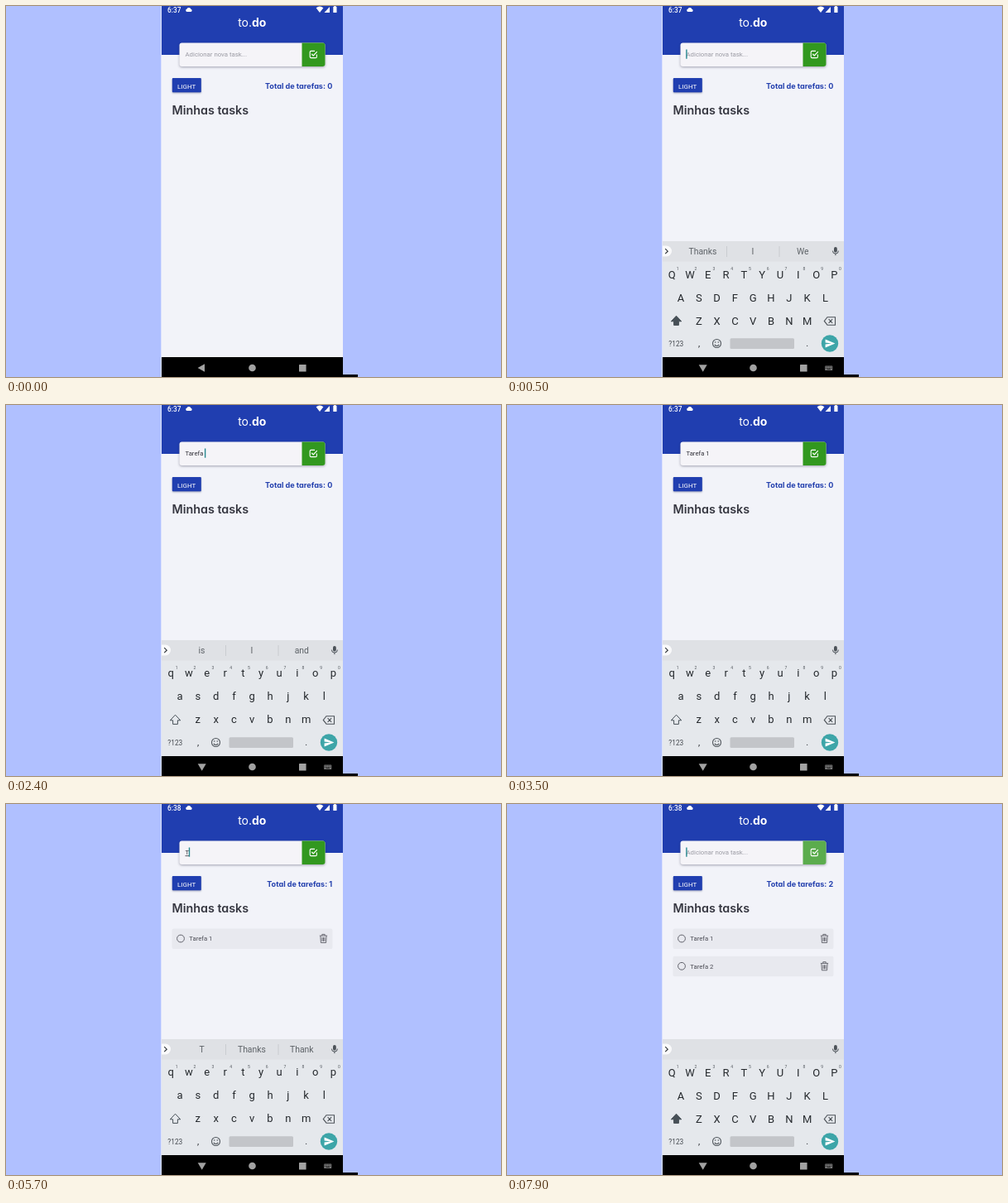
Write an HTML page with a canvas that moves like this. It is 598 by 448 pixels and loops after 8000 ms.

```html
<!DOCTYPE html>
<html lang="pt">
<head>
<meta charset="utf-8">
<title>to.do</title>
<style>
html, body { margin: 0; width: 100%; height: 100%; overflow: hidden; background: #b0c0ff; }
canvas, svg { position: absolute; left: 0; top: 0; }
text { font-family: Inter, "Open Sans", sans-serif; font-feature-settings: "cv11"; }
</style>
</head>
<body>
<canvas id="stage" width="598" height="448"></canvas>
<svg width="598" height="448">
  <text x="297.3" y="25.3" font-size="14" fill="#fff" text-anchor="middle">to.<tspan font-weight="700">do</tspan></text>
  <text id="total" x="394.3" y="99.5" font-size="9.1" font-weight="700" fill="#2440ae" text-anchor="end"></text>
  <text x="200.6" y="131.3" font-size="14.3" font-weight="600" fill="#363741">Minhas tasks</text>
</svg>
<script>
const LOOP = 8000;
const g = document.getElementById('stage').getContext('2d');
const total = document.getElementById('total');

// Each track is a list of [start, value] steps.
const typed = [[0, ''], [1700, 'T'], [1800, 'Ta'], [1900, 'Tar'], [2100, 'Tare'], [2200, 'Taref'],
  [2300, 'Tarefa'], [2400, 'Tarefa '], [2900, 'Tarefa 1'], [4400, ''], [5700, 'T'], [5800, 'Ta'],
  [6100, 'Tare'], [6200, 'Taref'], [6300, 'Tarefa'], [6400, 'Tarefa '], [6500, 'Tarefa 2'], [7900, '']];
const caret = [[0, 0], [100, 1], [600, 0], [1200, 1], [3500, 0], [4000, 1], [4800, 0], [5300, 1], [7100, 0], [7600, 1]];
const caps = [[0, 1], [1700, 0], [4400, 1], [5700, 0], [7900, 1]];
const press = [[0, 0], [4000, .5], [4100, 1], [4500, 0], [7600, 1]];
const tasks = [[0, 0], [4400, 1], [7900, 2]];
const lift = [[0, 150], [300, 85], [400, 18], [500, 0]];
const idle = [[0, 'Thanks I We'], [4400, ''], [4500, 'Thanks I We'], [7900, '']];
const hints = {
  T: 'T Thanks Thank', Ta: 'Ta Take Talk', Tar: 'Tar Target Tara', Tare: 'Tare Tared Tares',
  Taref: 'Taref Tarefa Tare', Tarefa: 'Tarefa Tarefas Tare', 'Tarefa ': 'is I and'
};

const at = (track, t) => track.reduce((v, s) => t >= s[0] ? s[1] : v, track[0][1]);

function box(x, y, w, h, color, r = 0) {
  g.fillStyle = color;
  g.beginPath();
  g.roundRect(x, y, w, h, r);
  g.fill();
}

function disc(x, y, r, color) {
  g.fillStyle = color;
  g.beginPath();
  g.arc(x, y, r, 0, 7);
  g.fill();
}

function ring(x, y, r, color, w = 1) {
  g.strokeStyle = color;
  g.lineWidth = w;
  g.beginPath();
  g.arc(x, y, r, 0, 7);
  g.stroke();
}

function fill(d, color) {
  g.fillStyle = color;
  g.fill(new Path2D(d));
}

function line(d, color, w = 1) {
  g.strokeStyle = color;
  g.lineWidth = w;
  g.stroke(new Path2D(d));
}

function label(s, x, y, size, color, align = 'left', weight = 400) {
  g.font = `${weight} ${size}px Roboto, Arial, sans-serif`;
  g.textAlign = align;
  g.fillStyle = color;
  g.fillText(s, x, y);
}

function shadow(color, blur, dy) {
  g.shadowColor = color;
  g.shadowBlur = blur;
  g.shadowOffsetY = dy;
}

const noShadow = () => shadow('transparent', 0, 0);

function drawHeader(t) {
  box(188, 0, 219, 59, '#203eb0');
  label(t < 4400 ? '6:37' : '6:38', 195, 7.6, 8.3, '#fff', 'left', 500);
  fill('M218.6 7a1.8 1.8 0 0 1 0-3.5a2.6 2.6 0 0 1 4.8 .3a1.7 1.7 0 0 1 .2 3.2z', '#fff');
  fill('M374.6 2.2Q379 -1 383.4 2.2L379 8z', '#fff');
  fill('M384.5 8L391 1V8z', '#fff');
  box(395.3, .8, 4.2, 7.2, '#fff', .6);
  box(396.4, 0, 2, 1, '#fff');
}

function drawInput(t) {
  const text = at(typed, t);
  shadow('rgba(40,40,70,.4)', 3, 1);
  box(209.5, 44.5, 176, 28.5, '#f5f4f8', 3);
  noShadow();
  const p = at(press, t);
  box(357.5, 44.5, 28, 28.5, `rgb(${50 + 41 * p},${152 + 20 * p},${31 + 46 * p})`, [0, 3, 3, 0]);
  line('M375.4 58.5V61.2Q375.4 62.6 374 62.6H368.6Q367.2 62.6 367.2 61.2V55.8Q367.2 54.4 368.6 54.4H373', '#fff', 1.1);
  line('M369.3 58L371.3 60L375.8 55.2', '#fff', 1.2);

  if (text) label(text, 216.5, 61.2, 7.7, '#303038');
  else label('Adicionar nova task...', 216.5, 61.2, 7.8, '#9b9ba4');
  g.font = '400 7.7px Roboto, Arial, sans-serif';
  const w = g.measureText(text).width;
  if (text && !text.includes(' ')) box(216.5, 62.3, w, .8, '#303038');
  if (at(caret, t)) box(216.2 + w, 52.5, 1.4, 11.2, '#27888f');
}

function drawTask(i) {
  const y = 150.5 + 33.3 * i;
  box(200.5, y, 194, 24.5, '#e8e9ef', 2);
  ring(211, y + 12, 4.4, '#62636c');
  label('Tarefa ' + (i + 1), 221.3, y + 14.9, 7.7, '#4a4b54');
  g.save();
  g.translate(383.5, y + 12);
  line('M-4.6 -3.4H4.6M-1.7 -3.6V-5.1H1.7V-3.6M-3.6 -3.2L-3.1 5H3.1L3.6 -3.2M-1.5 -1.5V3.4M0 -1.5V3.4M1.5 -1.5V3.4', '#5c5d66', .9);
  g.restore();
}

function drawKeys(upper) {
  const ink = '#25292d';
  ['qwertyuiop', 'asdfghjkl', 'zxcvbnm'].forEach((row, r) => {
    const x0 = [199.2, 210, 231.8][r];
    const y = 328.6 + 28.2 * r - (upper ? 0 : 1);
    [...row].forEach((c, i) => {
      label(upper ? c.toUpperCase() : c, x0 + 21.8 * i, y, 13, ink, 'center');
      if (!r) label((i + 1) % 10, x0 + 7 + 21.8 * i, 318.5, 5, '#555a60', 'center');
    });
  });

  const shift = 'M204.5 374.2L210.7 380.8H207.4V385.4H201.6V380.8H198.3z';
  if (upper) fill(shift, '#475057');
  line(shift, '#475057');
  line('M387 375.7H396.5V385.2H387L383.3 380.4zM388.6 378.2L393.2 382.8M393.2 378.2L388.6 382.8', '#4c5258', 1.1);

  label('?123', 195.3, 410.6, 8.3, '#454a50');
  label(',', 232, 411, 11, ink, 'center');
  label('.', 362.8, 411, 11, ink, 'center');
  ring(253.5, 407.5, 5, '#50565c', 1.1);
  disc(251.7, 406, .8, '#50565c');
  disc(255.3, 406, .8, '#50565c');
  line('M250.8 408.8Q253.5 412.2 256.2 408.8', '#50565c', 1.1);
  box(269.5, 401.3, 77.5, 12.7, '#c3c5c9', 1.5);
  disc(390, 407.5, 10.2, '#3da5a8');
  fill('M384.6 402.6L396.4 407.5L384.6 412.4V408.6L392 407.5L384.6 406.4z', '#fff');
}

function drawHints(words) {
  box(188, 284, 219, 24.5, '#dfe1e5');
  fill('M188 289.5H192.5A6.5 6.5 0 0 1 192.5 302.5H188z', '#fafafb');
  line('M191.2 293.2L194.2 296.2L191.2 299.2', '#33383d', 1.2);
  if (words) {
    box(265, 290, 1, 13, '#c9ccd0');
    box(328.5, 290, 1, 13, '#c9ccd0');
    words.split(' ').forEach((w, i) => label(w, 236.5 + 60.4 * i, 300, 10.4, '#5d6267', 'center'));
  }
  box(395, 291, 3.8, 6.6, '#4c5258', 1.9);
  line('M393.4 295.6A3.5 3.5 0 0 0 400.4 295.6M396.9 299V301.2', '#4c5258');
}

function drawKeyboard(t) {
  const text = at(typed, t);
  g.save();
  g.beginPath();
  g.rect(188, 0, 219, 424);
  g.clip();
  g.translate(0, at(lift, t));
  box(188, 284, 219, 140, '#e5e8ec');
  drawHints(text ? hints[text] || '' : at(idle, t));
  drawKeys(at(caps, t));
  g.restore();
}

function drawNav(open) {
  const grey = '#a2a2a2';
  box(188, 424, 219, 24, '#000');
  box(406, 445, 19, 3, '#000');
  fill(open ? 'M231.7 433.2H241.7L236.7 441.8z' : 'M240 432.2V441.8L231.6 437z', grey);
  disc(297.5, 437, 4.3, grey);
  box(354, 433, 8.6, 8.4, grey, .5);
  if (open) {
    box(384.2, 434.4, 9, 5.6, '#777', .6);
    for (let i = 0; i < 8; i++) box(385.2 + 2 * (i % 4), 435.4 + 1.5 * (i >> 2), .9, .8, '#000');
    box(386.6, 438.4, 4.2, .7, '#000');
  }
}

function draw(t) {
  const count = at(tasks, t);
  box(0, 0, 598, 448, '#b0c0ff');
  box(187.3, 0, 1, 448, '#eef0fb');
  box(188, 59, 219, 365, '#f2f3f9');
  drawHeader(t);
  drawInput(t);
  shadow('rgba(30,40,90,.4)', 2, 1);
  box(200.8, 87, 35, 17.3, '#203eb0', 1);
  noShadow();
  label('LIGHT', 218.2, 99.8, 8, '#fff', 'center');
  for (let i = 0; i < count; i++) drawTask(i);
  const open = t >= 300;
  if (open) drawKeyboard(t);
  drawNav(open);
  total.textContent = 'Total de tarefas: ' + count;
}

let start;
function tick(now) {
  start ??= now;
  draw((now - start) % LOOP);
  requestAnimationFrame(tick);
}
draw(0);
requestAnimationFrame(tick);
</script>
</body>
</html>
```
